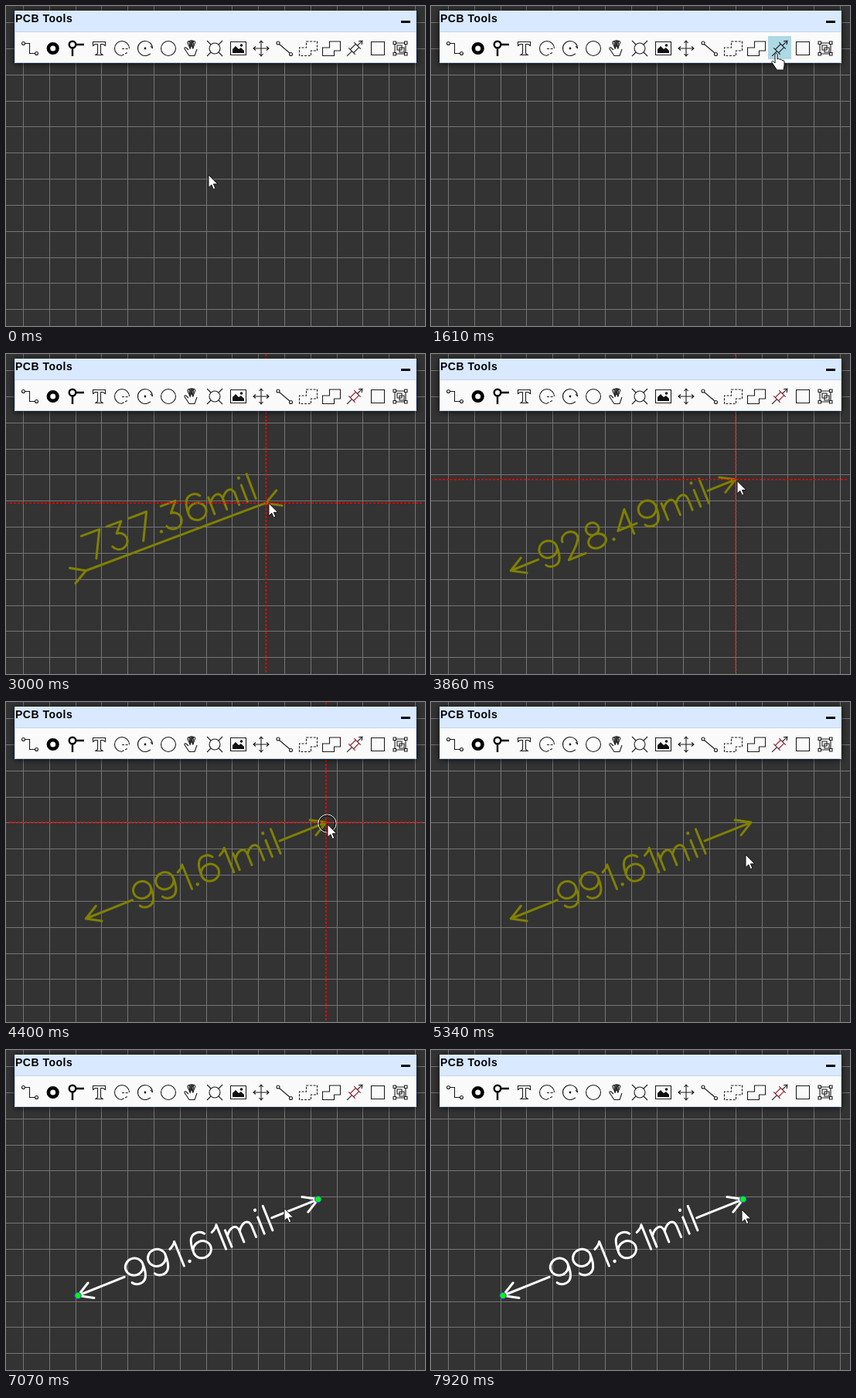
An HTML page that plays this animation: 542x415 px, repeating every 8 s.

```html
<!DOCTYPE html>
<html lang="en">
<head>
<meta charset="utf-8">
<title>PCB Tools</title>
<style>
  html, body { margin: 0; width: 100%; height: 100%; overflow: hidden; background: #333; }
  svg { display: block; }
  #title { font: bold 14px "Liberation Sans", Arial, sans-serif; letter-spacing: .5px; }
  #icons { fill: none; stroke: #1c1c1c; stroke-width: 1.1; }
  #icons .solid { fill: #111; stroke: none; }
  #icons .bold { stroke: #000; stroke-width: 2.4; }
  #icons .ring { stroke: #000; stroke-width: 4.6; }
  #icons .dash { stroke-dasharray: 3 1.6; }
  #icons .on { stroke: #8a1420; }
  #dim { fill: none; stroke-width: 3; stroke-linecap: round; stroke-linejoin: round; }
  #cross { fill: none; stroke: #f00; stroke-width: 1.6; stroke-dasharray: 3 2; }
  #dots { fill: #0f0; stroke: #33f; }
  #cursor { fill: #fff; stroke: #111; stroke-linejoin: round; }
</style>
</head>
<body>
<svg width="542" height="415" viewBox="0 0 542 415">
  <defs>
    <filter id="shade" x="-5%" y="-40%" width="110%" height="180%">
      <feDropShadow dx="0" dy="1" stdDeviation="4" flood-color="#000" flood-opacity=".75"/>
    </filter>
    <clipPath id="area"><path d="M2 0H540V413H2Z"/></clipPath>
  </defs>
  <rect width="542" height="415" fill="#333"/>
  <path id="grid" stroke="#757575" shape-rendering="crispEdges"/>
  <g id="dim"></g>
  <g id="dots"></g>
  <g clip-path="url(#area)"><path id="cross"/></g>
  <rect x="11" y="6" width="520" height="68" fill="#fafafa" filter="url(#shade)"/>
  <rect x="11" y="6" width="520" height="28" fill="#d9e9ff"/>
  <path d="M11 33.5H531" stroke="#c3d6ee"/>
  <path d="M11.5 6V73.5H530.5V6" fill="none" stroke="#bcd6f2"/>
  <text id="title" x="12" y="21">PCB Tools</text>
  <rect x="511" y="19" width="12" height="3"/>
  <rect id="hover" x="436" y="39" width="30" height="30" fill="#add8e6"/>
  <g id="icons"></g>
  <g id="ring" fill="none">
    <circle r="11.5" stroke="#fff"/>
    <circle r="10.5" stroke="#000"/>
  </g>
  <g id="cursor"></g>
</svg>
<script>
const LOOP = 8000, TICK = 78, STEP = 3.377, ORIGIN = [103.3, 281], END = [92, 37], GAP = 8;
const el = id => document.getElementById(id);
const path = (d, more = '') => `<path d="${d}" ${more}/>`;
const circle = (x, y, r, more = '') => `<circle cx="${x}" cy="${y}" r="${r}" ${more}/>`;
const box = (x, y, w, h = w) => `M${x} ${y}h${w}v${h}h${-w}Z`;
const oval = (x, y, rx, ry) => `M${x - rx} ${y}a${rx} ${ry} 0 1 0 ${2 * rx} 0a${rx} ${ry} 0 1 0 ${-2 * rx} 0`;
const fan = (n, angle, d) => Array.from({ length: n }, (_, k) => path(d, `transform="rotate(${angle(k)})"`)).join('');
const quarters = d => fan(4, k => k * 90, d);
const show = (id, on) => { el(id).style.display = on ? '' : 'none'; };

// Toolbar icons, each drawn around its own centre
const notched = 'M-1.5 -9H12.5V3H4.5V9.5H-10.5V-1H-1.5Z';
const icons = [
  circle(-7.5, -6.5, 2) + path('M-5.5 -6.5H.5V6.5H7.5') + circle(9.5, 6.5, 2),
  circle(.7, 0, 5.8, 'class="ring"'),
  circle(-4, -5, 4.3, 'class="bold"') + path('M0 -5H11M-4 -1V10', 'class="bold"'),
  path('M-7.5 -8.5H8.5V-3.5L5.5 -5.5H2.5V6.5L5 8.5H-4L-1.5 6.5V-5.5H-4.5L-7.5 -3.5Z'),
  path('M9.5 0A9.5 9.5 0 1 0 0 9.5') + path('M0 .5H9M0 9L8 5', 'class="dash"'),
  path('M9.5 0A9.5 9.5 0 1 0 3 9') + path('M3 9L7 7M7 -3L9.5 0') + circle(0, 0, 1.4, 'class="solid"'),
  circle(0, 0, 9.5),
  fan(4, k => k * 15 - 24, 'M-1.7 0V-8.5a1.7 1.7 0 0 1 3.4 0V0') + path('M-4 2L-7 -1C-9 -2 -10 0 -8 2L-3 9.5H4L7 1'),
  circle(0, 0, 7) + quarters('M-10 -10L-5 -5'),
  path(box(-9.5, -8.5, 20, 17)) + path('M-7 6V1L-3 -3L1 1L4 -1L8 3V6Z', 'class="solid"') + circle(4.5, -4, 1.8, 'class="solid"'),
  quarters('M0 0V-10M-2.5 -7L0 -10L2.5 -7'),
  circle(-8, -7, 2) + path('M-6.5 -5.5L7 6') + circle(8.5, 7.5, 2),
  path(notched, 'class="dash"'),
  path(notched),
  `<g transform="translate(1 0) rotate(-45)">${path('M-14 0H-5M5 0H14M10 -3L14 0L10 3')}${path(box(-5, -3, 10, 6) + 'M-5 -6V6M5 -6V6', 'id="tool"')}</g>`,
  path(box(-7.5, -8.5, 17)),
  quarters(box(-9, -9, 3.5) + 'M-5.5 -7H5.5') + path(box(-4, -4, 6) + box(-1, -1, 6))
];
el('icons').innerHTML = icons.map((s, i) => `<g transform="translate(${30 + 30 * i} 55)">${s}</g>`).join('');

let lines = '';
for (let k = 0; k < 16; k++) {
  const [x, y] = [22.4, 21.73].map(v => Math.floor(v + 33.81 * k) + .5);
  lines += `M${x} 0V415M0 ${y}H542`;
}
el('grid').setAttribute('d', lines);

// Stroke font: width, path and optional turn; baseline at 0, capitals 34 high
const six = oval(11.7, -11, 11.7, 11) + 'M0 -11C0 -26 4 -34 12 -34Q19 -34 22 -29';
const font = {
  0: [23.5, oval(11.7, -17, 11.7, 17)],
  1: [9, 'M0 -27Q7 -30 9 -34V0'],
  2: [23.5, 'M1 -25A10.5 9 0 0 1 22 -25C22 -19 14 -12 0 0H23.5'],
  3: [24, 'M2 -34H22L11 -21A11 10.5 0 1 1 0 -7'],
  4: [26, 'M18 0V-34L0 -11H26'],
  5: [23.5, 'M20 -34H3L1.5 -19A11.5 11.5 0 1 1 0 -6'],
  6: [23.5, six],
  7: [25, 'M0 -34H25L8 0'],
  8: [23.5, oval(11.7, -26, 8.5, 8) + oval(11.7, -9, 11.7, 9)],
  9: [23.5, six, 'translate(23.5 -34) rotate(180)'],
  '.': [2, oval(1, -3, .7, .7)],
  m: [34, 'M0 -23V0M0 -15C7 -25 17 -26 17 -15V0M17 -15C24 -25 34 -26 34 -15V0'],
  i: [7, 'M3.5 -23V0' + oval(3.5, -32.8, .6, .6)],
  l: [0, 'M0 -34V0']
};

const pointers = {
  arrow: path('M0 0V16.5L3.8 12.9L6.3 18.7L8.9 17.6L6.4 11.9H11.8Z'),
  hand: path('M0 1.5Q1.5 -1 3 1.5V8Q5 6 6 8.5Q8 7 9 9.5Q12 9 12 11V16L11 22H2.5L-4.5 11.5Q-3 9 0 13Z'),
  move: quarters('M-1.3 0V-6H-4L0 -10.5L4 -6H1.3V0')
};

// Pointer stops: start, end, x, y, strength of the ease-out
const stops = [
  [0, 0, 262, 219, 1],
  [910, 1610, 445, 61, 2],
  [2000, 2450, 105, 283.8, 2],
  [2830, 3300, 368, 182.7, 4],
  [3460, 3530, 384, 168, 1],
  [3700, 4260, 416, 158.8, 1],
  [4630, 4630, 416, 158.8, 1],
  [4860, 5340, 407, 198, 2],
  [5660, 5820, 330.5, 179.5, 1],
  [5980, 6130, 333.5, 223.5, 1],
  [6210, 6440, 299.5, 169.9, .85],
  [6590, 6760, 320.3, 217, 1],
  [6910, 7600, 398, 194, 2],
  [7770, 7920, 402, 207, 1]
];
const grab = stops[8].slice(2, 4);
const clicks = [350, 1840, 2690, 4400, 5510, 5820, 7680];

const latest = t => stops.filter(s => s[0] <= t).length - 1;

// The pointer moves in ticks, easing from the previous stop
function pointer(t) {
  const i = latest(t), [a, b, x, y, power] = stops[i];
  const [, , px, py] = stops[Math.max(0, i - 1)];
  const n = Math.round((b - a) / TICK) + 1;
  const k = Math.min(n, Math.floor((t + 8 - a) / TICK) + 1);
  const e = 1 - (1 - k / n) ** power;
  return [px + (x - px) * e, py + (y - py) * e];
}

const snap = ([x, y]) => [Math.round((x - 3.1 - ORIGIN[0]) / STEP), Math.round((ORIGIN[1] - y + 1.2) / STEP)];
const place = ([i, j], [sx, sy] = [0, 0]) => [ORIGIN[0] + sx + i * STEP, ORIGIN[1] + sy - j * STEP];

function dimension([i, j], shift, color) {
  const units = Math.hypot(i, j), len = units * STEP;
  const text = (units * 10).toFixed(2) + 'mil';
  const width = [...text].reduce((w, c) => w + font[c][0] + GAP, -GAP);
  const inline = len > width + 56, start = (len - width) / 2;
  const arm = inline ? 18.2 : -18.2;
  let d = `M${arm} -10.5L0 0L${arm} 10.5M${len - arm} -10.5L${len} 0L${len - arm} 10.5`;
  d += inline ? `M0 0H${start - 5}M${len - start + 5} 0H${len}` : `M0 0H${len}`;
  let x = start, glyphs = '';
  for (const c of text) {
    const [w, shape, turn = ''] = font[c];
    glyphs += path(shape, `transform="translate(${x} ${inline ? 15.5 : -10}) ${turn}"`);
    x += w + GAP;
  }
  const angle = -Math.atan2(j, i) * 180 / Math.PI;
  return `<g stroke="${color}" transform="translate(${place([0, 0], shift)}) rotate(${angle})">${path(d)}${glyphs}</g>`;
}

function draw(t) {
  const pos = pointer(t), [x, y] = pos, cell = snap(pos);
  const dragged = pointer(Math.min(t, 6900));
  const shift = t < 5980 ? [0, 0] : dragged.map((v, c) => v - grab[c]);

  const overTool = y < 69 && x > 436 && x < 466;
  const kind = overTool ? 'hand' : t >= 5820 && t < 6910 ? 'move' : 'arrow';
  el('cursor').innerHTML = pointers[kind];
  el('cursor').setAttribute('transform', `translate(${x} ${y})`);
  show('hover', overTool);
  el('tool').setAttribute('class', t >= 2000 ? 'on' : '');

  const [cx, cy] = place(cell);
  show('cross', t >= 2000 && t < 5250);
  el('cross').setAttribute('d', `M${cx} 0V415M0 ${cy}H542`);

  el('dim').innerHTML = t < 2830 ? '' : dimension(t < 4400 ? cell : END, shift, t < 5740 ? '#808000' : '#fff');
  el('dots').innerHTML = t < 6910 ? '' : [[0, 0], END].map(p => circle(...place(p, shift), 4.2)).join('');

  // A click ring stays until the pointer moves again
  show('ring', clicks.some(c => c <= t && latest(c) === latest(t)));
  el('ring').setAttribute('transform', `translate(${Math.floor(x) - .5} ${Math.floor(y) - .5})`);
}

function frame() {
  draw(performance.now() % LOOP);
  requestAnimationFrame(frame);
}
frame();
</script>
</body>
</html>
```
